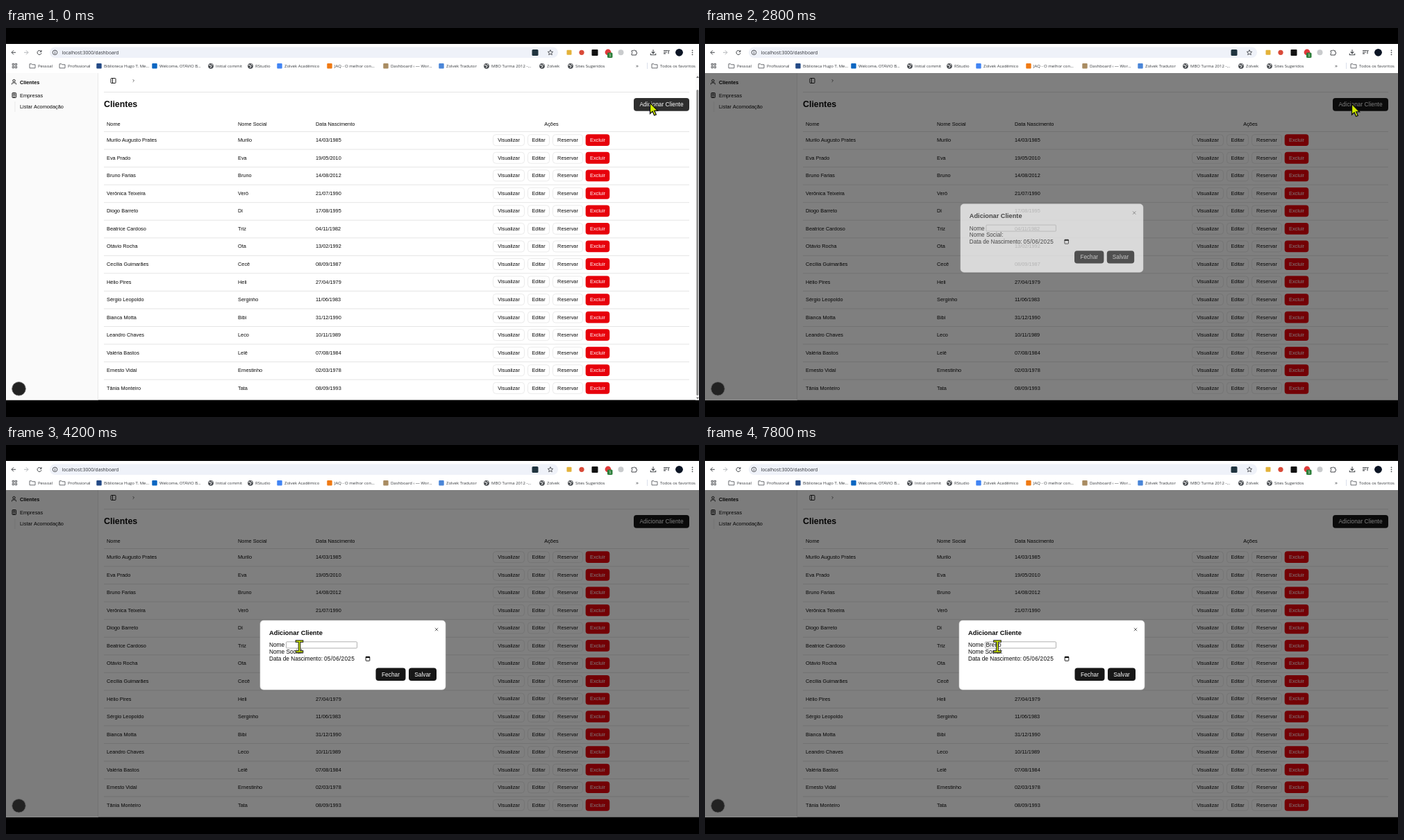
Write an HTML page with a canvas that moves like this. It is 998x561 px and loops after 8000 ms.

```html
<!DOCTYPE html>
<html lang="pt-BR">
<head>
<meta charset="utf-8">
<title>Clientes</title>
<style>
html, body { margin: 0; width: 100%; height: 100%; overflow: hidden; background: #000; }
canvas { display: block; }
</style>
</head>
<body>
<canvas id="stage" width="998" height="561"></canvas>
<script>
const ctx = document.getElementById('stage').getContext('2d');
const LOOP = 8000, STEP = 200;
const TOP = 23, PAGE = 65, BOTTOM = 536.5;
const ARIAL = '"Liberation Sans", Arial, sans-serif';
const UI = '"Open Sans", "Noto Sans", sans-serif';
const INK = '#0a0a0a', DARK = '#171717', LINE = '#e5e5e5', LIME = '#d2ee00';

const clients = [
  ['Murilo Augusto Prates', 'Murilo', '14/03/1985'],
  ['Eva Prado', 'Eva', '19/05/2010'],
  ['Bruno Farias', 'Bruno', '14/08/2012'],
  ['Verônica Teixeira', 'Verô', '21/07/1990'],
  ['Diogo Barreto', 'Di', '17/08/1995'],
  ['Beatrice Cardoso', 'Triz', '04/11/1982'],
  ['Otávio Rocha', 'Ota', '13/02/1992'],
  ['Cecília Guimarães', 'Cecê', '08/09/1987'],
  ['Hélio Pires', 'Heli', '27/04/1979'],
  ['Sérgio Leopoldo', 'Serginho', '11/06/1983'],
  ['Bianca Motta', 'Bibi', '31/12/1990'],
  ['Leandro Chaves', 'Leco', '10/11/1989'],
  ['Valéria Bastos', 'Lelê', '07/08/1984'],
  ['Ernesto Vidal', 'Ernestinho', '02/03/1978'],
  ['Tânia Monteiro', 'Tata', '08/09/1993']
];

// icon kind or colour, icon x, label
const bookmarks = [
  ['folder', 38, 'Pessoal'],
  ['folder', 81, 'Profissional'],
  ['#234a86', 134, 'Biblioteca Hugo T. Me...'],
  ['#0a66c2', 214, 'Welcome, OTÁVIO B...'],
  ['globe', 295, 'Initial commit'],
  ['globe', 352, 'RStudio'],
  ['#4285f4', 394, 'Zolvek Acadêmico'],
  ['#f07a13', 466, 'JAQ - O melhor con...'],
  ['#a98c62', 547, 'Dashboard ‹ — Wor...'],
  ['#4a86d8', 627, 'Zolvek Tradutor'],
  ['globe', 692, 'MBO Turma 2012 -...'],
  ['globe', 772, 'Zolvek'],
  ['globe', 813, 'Sites Sugeridos'],
  ['folder', 934, 'Todos os favoritos']
];

function rect(x, y, w, h, fill) {
  ctx.fillStyle = fill;
  ctx.fillRect(x, y, w, h);
}

function box(x, y, w, h, r, fill, stroke, lw = 1) {
  ctx.beginPath();
  ctx.roundRect(x, y, w, h, r);
  if (fill) { ctx.fillStyle = fill; ctx.fill(); }
  if (stroke) { ctx.strokeStyle = stroke; ctx.lineWidth = lw; ctx.stroke(); }
}

function disc(x, y, r, fill, stroke, lw = 1) {
  ctx.beginPath();
  ctx.arc(x, y, r, 0, 7);
  if (fill) { ctx.fillStyle = fill; ctx.fill(); }
  if (stroke) { ctx.strokeStyle = stroke; ctx.lineWidth = lw; ctx.stroke(); }
}

// d is SVG path data relative to (x, y)
function icon(x, y, d, stroke, lw = 1, fill) {
  const path = new Path2D(d);
  ctx.save();
  ctx.translate(x, y);
  if (fill) { ctx.fillStyle = fill; ctx.fill(path); }
  if (stroke) { ctx.strokeStyle = stroke; ctx.lineWidth = lw; ctx.stroke(path); }
  ctx.restore();
}

// y is the middle of the capitals
function text(s, x, y, { size = 7.35, color = INK, bold = false, align = 'left', font = ARIAL } = {}) {
  ctx.font = `${bold ? 'bold ' : ''}${size}px ${font}`;
  ctx.fillStyle = color;
  ctx.textAlign = align;
  ctx.fillText(s, x, y + size * 0.36);
}

function button(label, x, y, w, h, fill, color, size, stroke) {
  box(x, y, w, h, 4, fill, stroke, 0.8);
  text(label, x + w / 2, y + h / 2 - 0.2, { size, color, align: 'center' });
}

function drawBookmark([kind, x, label]) {
  const y = 54.8;
  if (kind === 'folder') {
    icon(x, y, 'M-4 -3H-1L0 -2H4V3H-4Z', '#5a5d61', 0.9);
  } else if (kind === 'globe') {
    disc(x, y, 3.9, '#4b4e52');
    icon(x, y, 'M-3 -1.3L0 -1L1 1L-1 2M1 -3L2.5 -1', '#fff', 1);
  } else {
    box(x - 3.7, y - 3.7, 7.4, 7.4, 1, kind);
  }
  text(label, x + (kind === 'folder' ? 8 : 7), y, { size: 6, color: '#36393d', font: UI });
}

function drawBrowser() {
  const c = '#44474b';
  rect(0, TOP, 998, PAGE - TOP, '#fff');
  box(63, 27.5, 732, 15.5, 7.7, '#eff2f9');
  icon(11, 35.3, 'M3 0H-3M0 -3L-3 0L0 3', c);
  icon(29, 35.3, 'M-3 0H3M0 -3L3 0L0 3', '#b4b7bb');
  icon(48, 35.3, 'M2.7 -1.3A3 3 0 1 0 3 .8M3 -3.4V-1H.7', c);
  disc(70.5, 35.3, 3.3, null, c, 0.9);
  icon(70.5, 35.3, 'M0 -.5V2M0 -2V-1.2', c, 0.9);
  text('localhost:3000/dashboard', 80.5, 35.3, { size: 6.75, color: '#303338', font: UI });

  box(757.5, 31, 9, 9, 1.5, '#20343f');
  icon(784, 35.3, 'M0 -3.7L1.1 -1.2L3.7 -1L1.7 .8L2.3 3.4L0 2L-2.3 3.4L-1.7 .8L-3.7 -1L-1.1 -1.2Z', c, 0.9);
  box(807.5, 31.8, 7, 7, 1, '#e4b23a');
  disc(829, 35.3, 3.6, '#d94a38');
  box(843.5, 31, 9, 9, 1, '#111');
  disc(867, 35, 4.4, '#df3b3b');
  box(866, 35.5, 7.5, 7.5, 1.5, '#2b7d38');
  text('1', 869.8, 39.3, { size: 6, color: '#fff', align: 'center' });
  disc(885.5, 35.3, 4, '#c9cbcd');
  icon(904.5, 35.3, 'M-3.5 -2.5H-1A1.2 1.2 0 0 1 1.3 -2.5H3V-.5A1.2 1.2 0 0 1 3 2V3.7H-3.5V1.5A1.2 1.2 0 0 0 -3.5 -.8Z', c);
  icon(932, 35.3, 'M0 -4V1.3M-2.3 -1L0 1.3L2.3 -1M-3.7 1.5V3.5H3.7V1.5', c, 1.1);
  icon(951, 35.3, 'M-4 -2.8H2M-4 -.6H1M-4 1.6H-1M3 -3V2M3 -2.7H4.5', c, 1.1);
  disc(969.5, 35.3, 5.4, '#0b1424');
  for (const dy of [-3, 0, 3]) disc(988.5, 35.3 + dy, 0.85, c);

  for (const dx of [-3, 1]) for (const dy of [-3, 1])
    box(12.2 + dx, 54.3 + dy, 2.4, 2.4, 0, null, c, 0.9);
  bookmarks.forEach(drawBookmark);
  text('»', 909, 54, { size: 8, color: c, align: 'center', font: UI });
  rect(923, 50, 0.8, 9, '#d3d9e6');
}

function drawSidebar() {
  rect(0, PAGE, 132, BOTTOM - PAGE, '#fafafa');
  rect(132, PAGE, 1, BOTTOM - PAGE, '#e8e8e8');
  disc(11.5, 76, 1.7, null, INK, 0.9);
  icon(11.5, 78, 'M-3 3.5V2.5Q-3 1 -1.5 1H1.5Q3 1 3 2.5V3.5', INK, 0.9);
  text('Clientes', 20, 78.3, { bold: true, size: 7.25 });
  box(9, 93.5, 5.5, 7, 0.8, '#c9c9c9', INK, 0.9);
  icon(11.7, 97, 'M-1.3 -1.7H1.3M-1.3 0H1.3M0 1.5V3', INK, 0.8);
  text('Empresas', 20, 97);
  rect(12.5, 106, 0.8, 15, LINE);
  text('Listar Acomodação', 20, 113.7);
}

function drawPage(hover) {
  rect(0, PAGE, 998, BOTTOM - PAGE, '#fff');
  drawSidebar();
  box(151, 72.5, 7, 7, 1, null, INK, 0.9);
  rect(153, 72.5, 0.9, 7, INK);
  icon(183.5, 76, 'M-.8 -1.8L1 0L-.8 1.8', '#555', 0.9);
  rect(141, 92, 843, 1, LINE);

  text('Clientes', 141, 109.3, { size: 12.4, bold: true });
  button('Adicionar Cliente', 904, 101, 80, 18.8, hover ? '#2e2e2e' : DARK, '#fafafa', 8.35);

  text('Nome', 145, 138.6);
  text('Nome Social', 334, 138.6);
  text('Data Nascimento', 446, 138.6);
  text('Ações', 785.5, 138.6, { align: 'center' });

  clients.forEach(([name, social, born], i) => {
    const y = 161.6 + i * 25.54, top = y - 8.3;
    rect(141, y - 12.6, 843, 1, LINE);
    text(name, 145, y);
    text(social, 334, y);
    text(born, 446, y);
    button('Visualizar', 701.5, top + 0.4, 45, 16, '#fff', INK, 7.35, LINE);
    button('Editar', 751.5, top + 0.4, 31, 16, '#fff', INK, 7.35, LINE);
    button('Reservar', 787.5, top + 0.4, 43, 16, '#fff', INK, 7.35, LINE);
    button('Excluir', 834.7, top, 34.6, 16.8, '#e7000b', '#fff', 7.35);
  });
}

function drawScrollbar() {
  rect(993, PAGE, 5, BOTTOM - PAGE, '#fafafa');
  box(994.3, 89, 3, 441, 1.5, '#8d8d8d');
  icon(996, 70.5, 'M-2 1.5L0 -1.5L2 1.5Z', null, 0, '#777');
  icon(996, 534, 'M-2 -1.5L0 1.5L2 -1.5Z', null, 0, '#777');
}

function drawDialog(open, typed) {
  const cx = 499.5, cy = 303, scale = 0.95 + 0.05 * open;
  ctx.save();
  ctx.globalAlpha = open;
  ctx.translate(cx, cy);
  ctx.scale(scale, scale);
  ctx.translate(-cx, -cy);
  box(366, 253, 267, 100, 5, '#fff', '#d6d6d6', 0.6);
  text('Adicionar Cliente', 379, 270.5, { size: 9.35, bold: true });
  icon(620, 266, 'M-2.2 -2.2L2.2 2.2M2.2 -2.2L-2.2 2.2', '#5c5c5c', 0.9);

  text('Nome', 379, 288.5, { size: 8.3 });
  box(403.5, 283.8, 102, 9.2, 1, null, '#a8a8a8', 0.9);
  text(typed, 404.5, 288.5, { size: 8.3 });
  text('Nome Social:', 379, 298, { size: 8.3 });
  text('Data de Nascimento:', 379, 307.8, { size: 8.25 });
  ctx.letterSpacing = '0.25px';
  text('05/06/2025', 458, 307.8, { size: 8.3 });
  ctx.letterSpacing = '0px';
  box(518.2, 305.3, 5.6, 6, 0.6, null, INK, 0.9);
  rect(518, 305, 6, 2, INK);

  button('Fechar', 532.5, 321.5, 43, 18.5, DARK, '#fafafa', 8.35);
  button('Salvar', 580, 321.5, 40, 18.5, DARK, '#fafafa', 8.35);
  ctx.restore();
}

function drawArrow(x, y) {
  icon(x, y, 'M0 0V15.5L3.6 12.3L6.1 18L8.8 16.8L6.3 11.3H11Z', '#111', 1.3, LIME);
}

function drawBeam(x, y) {
  const d = 'M-4 -7.5H4M0 -7.5V7.5M-4 7.5H4';
  ctx.lineCap = 'square';
  icon(x, y, d, '#111', 3.6);
  icon(x, y, d, LIME, 1.7);
  ctx.lineCap = 'butt';
}

const clamp = v => Math.min(1, Math.max(0, v));
const ease = v => v * v * (3 - 2 * v);
const mix = (a, b, k) => a + (b - a) * k;

function drawCursor(t) {
  if (t >= 4200) {
    drawBeam(mix(422.5, 421, clamp((t - 4200) / 800)), 290.5);
    return;
  }
  const settle = clamp(t / 1200), go = ease(clamp((t - 3200) / 1000));
  const x = mix(mix(927.5, 931.5, settle), 422, go);
  const y = mix(mix(108, 109.5, settle), 290, go);
  drawArrow(x, y);
}

function typedAt(t) {
  if (t < 7200) return '';
  return 'Breno'.slice(0, [1, 2, 4, 5][Math.min(3, (t - 7200) / STEP)]);
}

function draw(t) {
  const open = t < 2800 ? 0 : t < 3000 ? 0.7 : 1;
  rect(0, 0, 998, 561, '#000');
  drawPage(t < 2800);
  if (open) {
    rect(0, PAGE, 998, BOTTOM - PAGE, 'rgba(0,0,0,0.5)');
  } else {
    drawScrollbar();
  }
  drawBrowser();
  if (open) drawDialog(open, typedAt(t));
  disc(18.5, 520.3, 9.8, '#222', '#666', 0.8);
  drawCursor(t);
}

const start = performance.now();
function tick() {
  const t = (performance.now() - start) % LOOP;
  draw(Math.floor(t / STEP) * STEP);
  requestAnimationFrame(tick);
}
tick();
</script>
</body>
</html>
```
